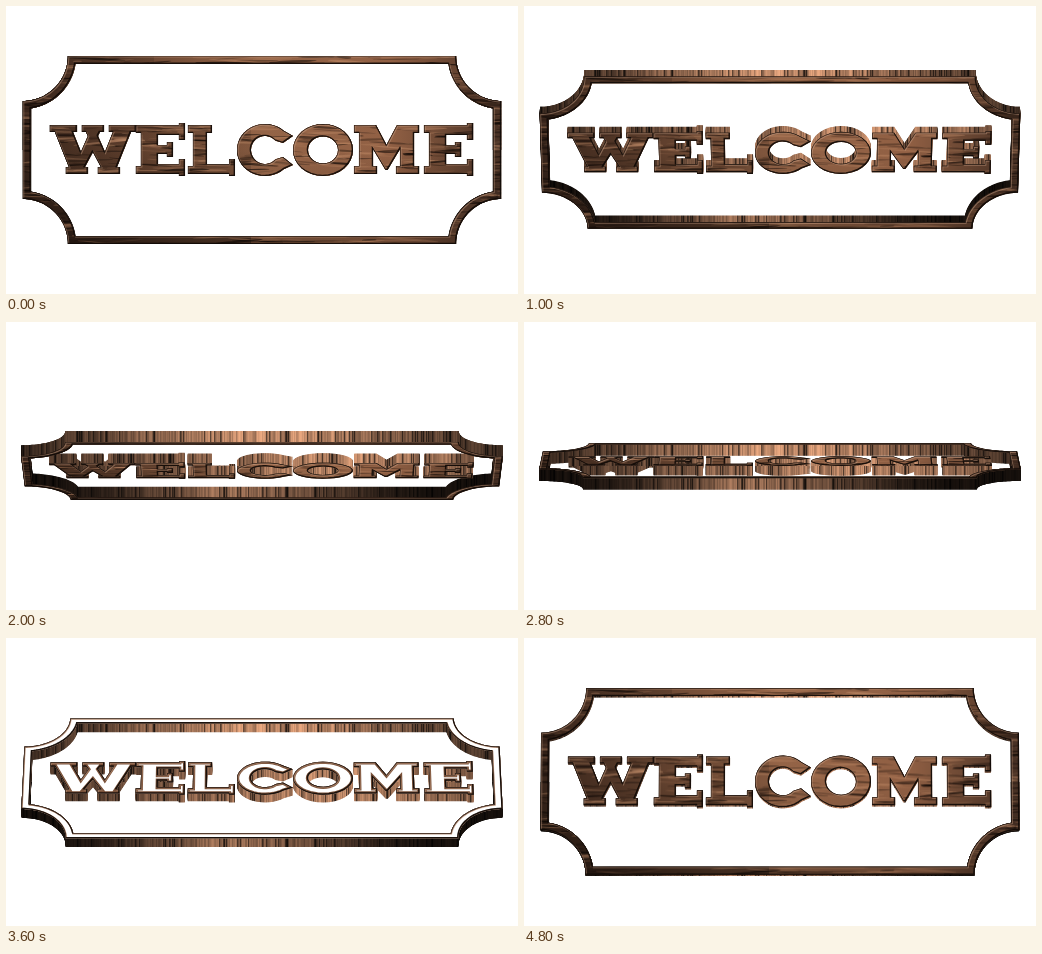
An HTML page with a canvas for the animation above (5 s loop, 512x288 px).

```html
<!DOCTYPE html>
<html lang="en">
<head>
<meta charset="utf-8">
<title>Welcome sign</title>
<style>
html, body { margin: 0; width: 100%; height: 100%; overflow: hidden; background: #fff; }
canvas { display: block; }
</style>
</head>
<body>
<canvas id="stage" width="512" height="288" role="img" aria-label="WELCOME"></canvas>
<script>
const W = 512, H = 288, CX = W / 2, CY = H / 2;
const STEP = 200, STEPS = 25, CAMERA = 6000;
const TOP = 119, BASE = 168, SERIF = 8;
const ctx = document.getElementById('stage').getContext('2d');

let seed = 41;
function rnd() {
  seed = (seed * 16807) % 2147483647;
  return seed / 2147483647;
}

function newCanvas() {
  const c = document.createElement('canvas');
  c.width = W;
  c.height = H;
  return c;
}

// Wooden front: darker to the left and bottom, with grain streaks on top
function makeWood() {
  const c = newCanvas(), g = c.getContext('2d');
  const fade = (w, h, colors) => {
    const grad = g.createLinearGradient(0, 0, w, h);
    colors.forEach((color, i) => grad.addColorStop(i / (colors.length - 1), color));
    return grad;
  };
  g.fillStyle = fade(W, 0, ['#38251b', '#684531', '#946447', '#916044', '#3c291f']);
  g.fillRect(0, 0, W, H);
  g.fillStyle = fade(0, H, ['rgba(0,0,0,.15)', 'rgba(0,0,0,.1)', 'rgba(0,0,0,.75)']);
  g.fillRect(0, 0, 148, 110);
  g.fillRect(0, 110, 245, H);
  g.fillStyle = fade(0, H, ['rgba(0,0,0,0)', 'rgba(0,0,0,0)', 'rgba(0,0,0,.4)']);
  g.fillRect(245, 0, W, H);
  for (let i = 0; i < 1500; i++) {
    g.fillStyle = rnd() < 0.55
      ? `rgba(14,8,5,${0.15 + rnd() * 0.55})`
      : `rgba(205,150,112,${0.08 + rnd() * 0.32})`;
    g.beginPath();
    g.ellipse(rnd() * W, rnd() * H, 4 + rnd() * 28, 0.4 + rnd() * 0.9, (rnd() - 0.5) * 0.2, 0, 7);
    g.fill();
  }
  return c;
}

const bump = (x, mid, width) => Math.exp(-(((x - mid) / width) ** 2));

// Sides: the grain pulled through the thickness as upright strips
function makeStrips(upper, lower) {
  const c = newCanvas(), g = c.getContext('2d');
  [upper, lower].forEach((shade, row) => {
    let grain = 0.8;
    for (let x = 0; x < W; x++) {
      const next = rnd() < 0.14 ? 0.1 : 0.65 + rnd() * 0.55;
      grain = grain * 0.4 + next * 0.6;
      const v = shade(x) * grain;
      g.fillStyle = `rgb(${220 * v},${158 * v},${120 * v})`;
      g.fillRect(x, row * CY, 1, CY);
    }
  });
  return ctx.createPattern(c, 'repeat');
}

const wood = makeWood();
const frameStrips = makeStrips(x => 0.2 + 0.75 * bump(x, 265, 175), x => 0.1 + 0.65 * bump(x, 235, 105));
const letterShade = x => 0.4 + 0.5 * bump(x, 330, 180);
const letterStrips = makeStrips(letterShade, letterShade);

function arc(cx, cy, rx, ry, from, to) {
  const n = 32;
  return Array.from({ length: n + 1 }, (_, i) => {
    const a = (from + (to - from) * i / n) * Math.PI / 180;
    return [cx + rx * Math.cos(a), cy + ry * Math.sin(a)];
  });
}

const mirrorX = (pts, axis) => pts.concat(pts.map(([x, y]) => [2 * axis - x, y]).reverse());
const mirrorY = (pts, axis) => pts.concat(pts.map(([x, y]) => [x, 2 * axis - y]).reverse());

// Border outline moved inwards by i: four scooped corners
function border(i) {
  const r = 45 + i, a = Math.asin(i / r) * 180 / Math.PI;
  return mirrorY(mirrorX(arc(17, 50, r, r, 90 - a, a), CX), CY);
}

// Left edge of a stem with its two serifs, and the upturned end of an arm
const spine = x => [
  [x, TOP], [x, TOP + SERIF], [x + 5, TOP + SERIF],
  [x + 5, BASE - SERIF], [x, BASE - SERIF], [x, BASE]
];
const toe = x => [
  [x - 6, BASE], [x - 6, BASE + 2], [x, BASE + 2],
  [x, BASE - 15], [x - 6, BASE - 15], [x - 6, BASE - 10]
];

function letterE(x) {
  const arm = [[22, 158], [22, 148], [31, 148], [31, 151], [37, 151]].map(([dx, y]) => [x + dx, y]);
  return [mirrorY([...spine(x).slice(3), ...toe(x + 49), ...arm], (TOP + BASE) / 2)];
}

function letterW(x) {
  const low = TOP + SERIF - 1, foot = BASE - SERIF + 1;
  const leftHalf = [
    [43, TOP], [32, TOP], [32, low], [36, low], [38, 130], [31, 146], [23, low], [27, low], [27, TOP],
    [0, TOP], [0, low], [5, low], [19, foot], [16, foot], [16, BASE], [38, BASE], [38, foot],
    [35, foot], [43, 146]
  ];
  return [mirrorX(leftHalf.map(([dx, y]) => [x + dx, y]), x + 43)];
}

function letterL(x) {
  return [[...spine(x), ...toe(x + 47), [x + 19, BASE - 10], [x + 19, TOP + SERIF],
    [x + 24, TOP + SERIF], [x + 24, TOP]]];
}

function letterC(cx) {
  const tip = [[cx + 28, 159], [cx + 18, 151]];
  return [[...arc(cx, CY, 28, 26, 48, 312), [cx + 28, 130], [cx + 18, 137],
    ...arc(cx, CY, 14, 14, 318, 42), ...tip.reverse()]];
}

function letterO(cx) {
  return [arc(cx, CY, 30, 26, 0, 360), arc(cx, CY, 15, 13.5, 0, 360)];
}

function letterM(x) {
  const mid = x + 32.5, foot = BASE - SERIF;
  return [mirrorX([[mid, 139], [x + 22, TOP], ...spine(x), [x + 23, BASE], [x + 23, foot],
    [x + 19, foot], [x + 19, 143], [mid - 1, 164]], mid)];
}

const frame = { lines: [border(0), border(8)], strips: frameStrips, depth: 5.7, bevel: 1.2 };
const letters = [
  letterW(44), letterE(130), letterL(182), letterC(259), letterO(317), letterM(348), letterE(418)
].map(lines => ({ lines, strips: letterStrips, depth: 5, bevel: 2.2 }));

function trace(lines, z, cos, sin) {
  const path = new Path2D();
  for (const line of lines) {
    line.forEach(([px, py], i) => {
      const x = px - CX, y = py - CY;
      const k = CAMERA / (CAMERA - z * cos + y * sin);
      const sx = CX + x * k, sy = CY + (y * cos + z * sin) * k;
      i ? path.lineTo(sx, sy) : path.moveTo(sx, sy);
    });
    path.closePath();
  }
  return path;
}

function strokeAt(path, shift, color, width) {
  ctx.save();
  ctx.translate(shift, shift);
  ctx.strokeStyle = color;
  ctx.lineWidth = width;
  ctx.stroke(path);
  ctx.restore();
}

function drawPiece({ lines, strips, depth, bevel }, cos, sin, glare) {
  ctx.fillStyle = strips;
  const layers = Math.max(3, Math.ceil(24 * Math.abs(sin)));
  for (let i = 0; i < layers; i++) {
    ctx.fill(trace(lines, depth * (2 * i / layers - 1), cos, sin), 'evenodd');
  }

  const face = trace(lines, depth, cos, sin);
  ctx.save();
  ctx.clip(face, 'evenodd');
  ctx.save();
  ctx.transform(1, 0, 0, cos, CX, CY + depth * sin);
  ctx.drawImage(wood, -CX, -CY);
  ctx.restore();
  ctx.fillStyle = `rgba(255,255,255,${glare})`;
  ctx.fillRect(0, 0, W, H);
  // Bevel: lit from the upper left
  strokeAt(face, 0, `rgba(122,82,58,${glare})`, 2 * bevel);
  strokeAt(face, 0.7, 'rgba(205,165,138,.45)', 1.6);
  strokeAt(face, -0.6, 'rgba(10,6,4,.85)', 1.5);
  strokeAt(face, 0, 'rgba(24,14,9,.8)', 1.2);
  ctx.restore();
}

function draw(time) {
  const n = Math.floor(time / STEP) % STEPS;
  const deg = n * 180 / STEPS - (n > STEPS / 2 ? 180 : 0);
  const cos = Math.cos(deg * Math.PI / 180), sin = Math.sin(deg * Math.PI / 180);
  const glare = Math.min(1, 1.6 * bump(deg, -50.4, 8));
  ctx.fillStyle = '#fff';
  ctx.fillRect(0, 0, W, H);
  drawPiece(frame, cos, sin, glare);
  for (const piece of letters) drawPiece(piece, cos, sin, glare);
  // The half of the border nearest the viewer covers the lettering
  ctx.save();
  ctx.beginPath();
  ctx.rect(0, deg >= 0 ? 0 : CY, W, CY);
  ctx.clip();
  drawPiece(frame, cos, sin, glare);
  ctx.restore();
}

const start = performance.now();
function tick() {
  draw(performance.now() - start);
  requestAnimationFrame(tick);
}
tick();
</script>
</body>
</html>
```
